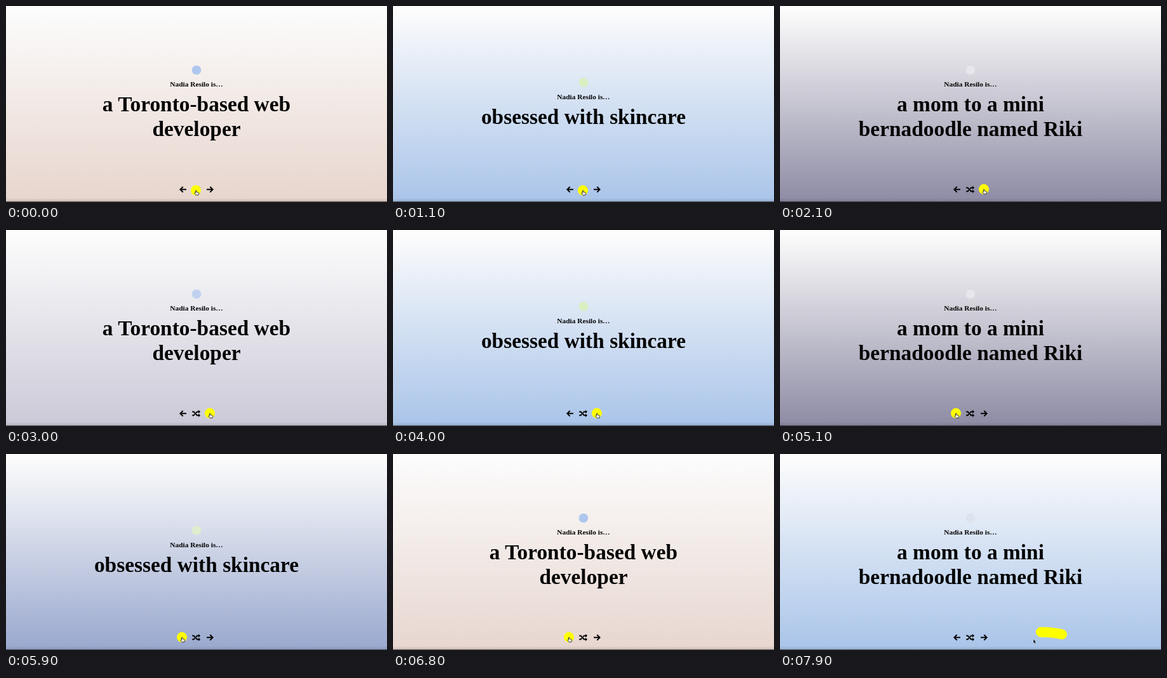
Write an HTML page that moves like this. It is 600 px wide and 309 px high and loops after 8 s.

```html
<!DOCTYPE html>
<html lang="en">
<head>
<meta charset="utf-8">
<title>Nadia Resilo is…</title>
<style>
  html, body { margin: 0; width: 100%; height: 100%; overflow: hidden; background: #fcfcfc; }
  svg { display: block; width: 100vw; height: 100vh; }
  text { font-family: "Liberation Serif", "Times New Roman", serif; font-weight: 700; text-anchor: middle; fill: #050505; }
  .intro { font-size: 11.4px; }
  .head { font-size: 33.4px; }
  .icon { fill: none; stroke: #050505; stroke-width: 2; }
</style>
</head>
<body>
<svg viewBox="0 0 600 309">
  <defs>
    <linearGradient id="sky" x1="0" y1="0" x2="0" y2="1">
      <stop offset="0" stop-color="#fcfcfc"/>
      <stop offset=".02" stop-color="#fcfcfc"/>
      <stop id="tint" offset="1"/>
    </linearGradient>
    <linearGradient id="shade" x1="0" y1="0" x2="0" y2="1">
      <stop offset="0" stop-color="#222" stop-opacity="0"/>
      <stop offset="1" stop-color="#222" stop-opacity=".13"/>
    </linearGradient>
  </defs>
  <rect width="600" height="309" fill="url(#sky)"/>
  <rect y="303" width="600" height="5" fill="url(#shade)"/>
  <rect y="308" width="600" height="1" fill="#111" opacity=".65"/>

  <g id="block">
    <circle id="dot" cx="300" cy="101" r="7.3"/>
    <text class="intro" x="300" y="127.3">Nadia Resilo is…</text>
    <text class="head" id="line1" x="300" y="166"></text>
    <text class="head" id="line2" x="300" y="204.5"></text>
  </g>

  <g class="icon">
    <path d="M284 289.3H274.6M278.7 285L274.4 289.3L278.7 293.6"/>
    <path d="M316 289.3H325.4M321.3 285L325.6 289.3L321.3 293.6"/>
    <path d="M293.2 286.5H295.6L301 292.2H303.4M293.2 292.2H295.6L297.3 290.4M299.4 288.2L301 286.5H303.4"/>
    <path d="M303 283.8L306.2 286.5L303 289.2ZM303 289.5L306.2 292.2L303 294.9Z" fill="#050505" stroke="none"/>
  </g>

  <path id="glow" fill="none" stroke="#ff0" stroke-width="16" stroke-linecap="round"/>
  <g id="hand">
    <path d="M-1.6-3.4q.8-.8 1.5 0v2.2l3 .7q.9.3.8 1.3l-.7 2.8h-4l-2.2-3q.2-1 1.6-.2z" fill="#fff" stroke="#222" stroke-width=".9" stroke-linejoin="round"/>
  </g>
  <path id="arrow" d="M-1-2v6.2l1.4-1.2l1 2.2l1.2-.6l-1-2.1h1.8z" fill="#111" stroke="#fff" stroke-width=".3"/>
</svg>
<script>
  const LOOP = 8000, STEP = 100, FADE = 300;
  const $ = id => document.getElementById(id);

  const text = {
    dev: ["a Toronto-based web", "developer"],
    mom: ["a mom to a mini", "bernadoodle named Riki"],
    skin: ["obsessed with skincare", ""]
  };

  // start time, slide, background tint, dot colour
  const slides = [
    [0, "dev", "#e7d5cd", "#afc7ee"],
    [700, "skin", "#a9c4e9", "#d9efbf"],
    [1700, "mom", "#8d8ba4", "#e7e6ec"],
    [2700, "dev", "#cbc9d7", "#c0d2f0"],
    [3700, "skin", "#a9c4e9", "#d9efbf"],
    [4800, "mom", "#8d8ba4", "#e7e6ec"],
    [5600, "skin", "#99a8ce", "#dfeccd"],
    [6400, "dev", "#e7d6cf", "#afc7ee"],
    [7300, "mom", "#a9c4e9", "#dce3ed"]
  ];

  // pointer stops: time, x, y
  const stops = [
    [0, 300, 294.5], [1200, 300, 294.5], [1500, 322, 292.8], [4500, 322, 292.8],
    [4800, 278, 292.8], [7700, 278, 292.8], [7900, 400, 294], [8000, 461, 295]
  ];

  const mix = (a, b, k) => a + (b - a) * k;
  const rgb = hex => [1, 3, 5].map(i => parseInt(hex.slice(i, i + 2), 16));
  const blend = (a, b, k) => {
    const to = rgb(b);
    return `rgb(${rgb(a).map((v, i) => Math.round(mix(v, to[i], k)))})`;
  };

  function pointer(t) {
    const i = Math.max(1, stops.findIndex(s => s[0] >= t));
    const [t0, x0, y0] = stops[i - 1], [t1, x1, y1] = stops[i];
    const k = (t - t0) / (t1 - t0);
    return [mix(x0, x1, k), mix(y0, y1, k)];
  }

  function draw(t) {
    let i = slides.length - 1;
    while (slides[i][0] > t) i--;
    const [start, name, tint, dot] = slides[i];
    const prev = slides[Math.max(0, i - 1)];
    const k = Math.min(1, (t - start) / FADE);
    $("tint").setAttribute("stop-color", blend(prev[2], tint, k));
    $("dot").setAttribute("fill", blend(prev[3], dot, k));
    $("line1").textContent = text[name][0];
    $("line2").textContent = text[name][1];
    $("block").setAttribute("transform", `translate(0 ${name === "skin" ? 19.5 : 0})`);

    // the highlight stretches and runs ahead when the pointer leaves
    const [x, y] = pointer(t);
    const away = Math.min(1, Math.max(0, (t - 7700) / 200));
    const hx = x - 1 + 12 * away, hy = y - 4 - 9.3 * away;
    $("glow").setAttribute("d",
      `M${hx} ${hy}q${17 * away} 0 ${33 * away + .01} ${3.5 * away}`);
    const place = `translate(${x} ${y})`;
    $("hand").setAttribute("transform", place);
    $("arrow").setAttribute("transform", place);
    $("hand").style.display = away ? "none" : "";
    $("arrow").style.display = away ? "" : "none";
  }

  const origin = performance.now();
  function tick() {
    const t = (performance.now() - origin) % LOOP;
    draw(Math.floor(t / STEP) * STEP);
    requestAnimationFrame(tick);
  }
  tick();
</script>
</body>
</html>
```
